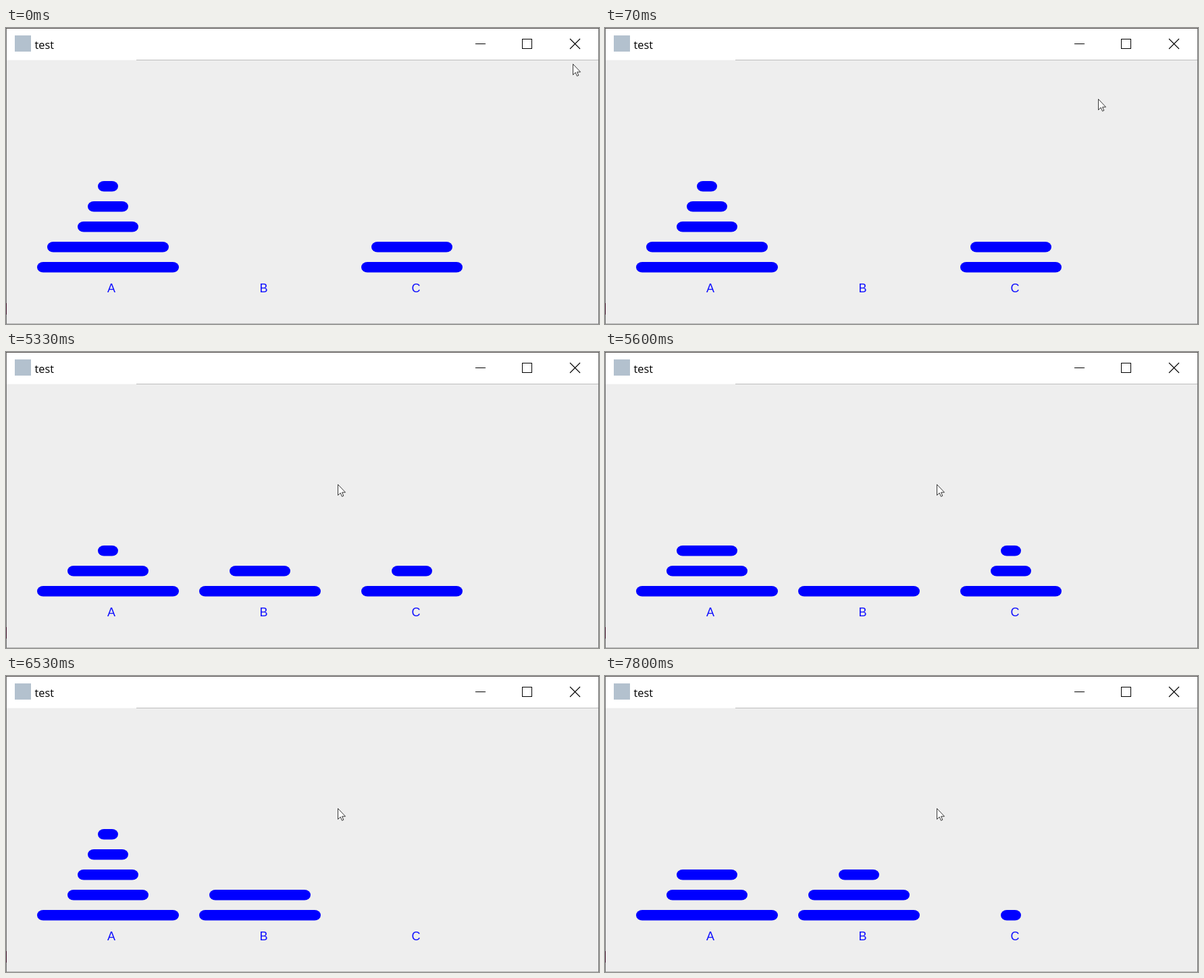
These frames come from a looping animation (878 by 439 pixels, 8 s). An HTML page:

```html
<!DOCTYPE html>
<html lang="en">
<head>
<meta charset="utf-8">
<title>test</title>
<style>
  html, body { margin: 0; width: 100%; height: 100%; overflow: hidden; background: #eee; }
  svg { display: block; }
  .label { font: 18px "Liberation Sans", Arial, sans-serif; fill: #11f; }
  .title { font: 16.4px "Open Sans", "Noto Sans", sans-serif; }
</style>
</head>
<body>
<svg width="878" height="439" viewBox="0 0 878 439">
  <rect width="878" height="439" fill="#eee"/>
  <rect width="878" height="47" fill="#fff"/>
  <g shape-rendering="crispEdges">
    <path d="M0 47.5H193" stroke="#f8f8f8"/>
    <path d="M193 47.5H878" stroke="#bdbdbd"/>
    <path d="M0 .5H878" stroke="#55514f"/>
    <path d="M.5 1V439M877.5 1V439" stroke="#737373"/>
    <path d="M1 438.5H877" stroke="#b5b5b5"/>
    <path d="M.5 408V425" stroke="#401028"/>
    <path d="M695 23.5H710M764.5 16.5H778.5V30.5H764.5Z" fill="none" stroke="#000"/>
  </g>
  <path d="M835 16L850 31M850 16L835 31" stroke="#000" stroke-width="1.1"/>
  <rect x="13" y="11" width="24" height="24" fill="#b3c1ce"/>
  <text class="title" x="42.5" y="31">test</text>
  <g id="disks" fill="#00f"></g>
  <g class="label">
    <text x="150" y="392">A</text>
    <text x="375.5" y="392">B</text>
    <text x="600.5" y="392">C</text>
  </g>
  <path id="cursor" d="M.5 .5V16.5L4.2 13L6.5 18.3L8.8 17.3L6.6 12.2H11.5Z" fill="#fff" stroke="#222" stroke-width=".9"/>
</svg>
<script>
  const LOOP = 8000;
  // Each entry: start time, then the disks on pegs A, B and C from the bottom up.
  const towers = [
    [0, "76321", "", "54"],
    [5330, "741", "63", "52"],
    [5600, "743", "6", "521"],
    [6330, "7432", "61", "5"],
    [6530, "74321", "65", ""],
    [7800, "743", "652", "1"]
  ];
  const pointer = [
    [0, 839, 53], [70, 730, 105], [135, 621, 156], [200, 512, 208], [5330, 491, 196]
  ];
  const pegX = [151, 376, 601];
  const disks = document.getElementById("disks");
  const cursor = document.getElementById("cursor");

  const at = (steps, t) => steps.filter(s => s[0] <= t).pop();

  function disk(size, peg, level) {
    const w = size * 30, x = pegX[peg] - w / 2, y = 347 - level * 30;
    return `<rect x="${x}" y="${y}" width="${w}" height="15.5" rx="9" ry="7.75"/>`;
  }

  let shown;
  function draw(now) {
    const t = now % LOOP;
    const state = at(towers, t);
    if (state !== shown) {
      shown = state;
      disks.innerHTML = state.slice(1).map((stack, peg) =>
        [...stack].map((size, level) => disk(size, peg, level)).join("")).join("");
    }
    const [, x, y] = at(pointer, t);
    cursor.setAttribute("transform", `translate(${x} ${y})`);
    requestAnimationFrame(draw);
  }
  draw(0);
</script>
</body>
</html>
```
